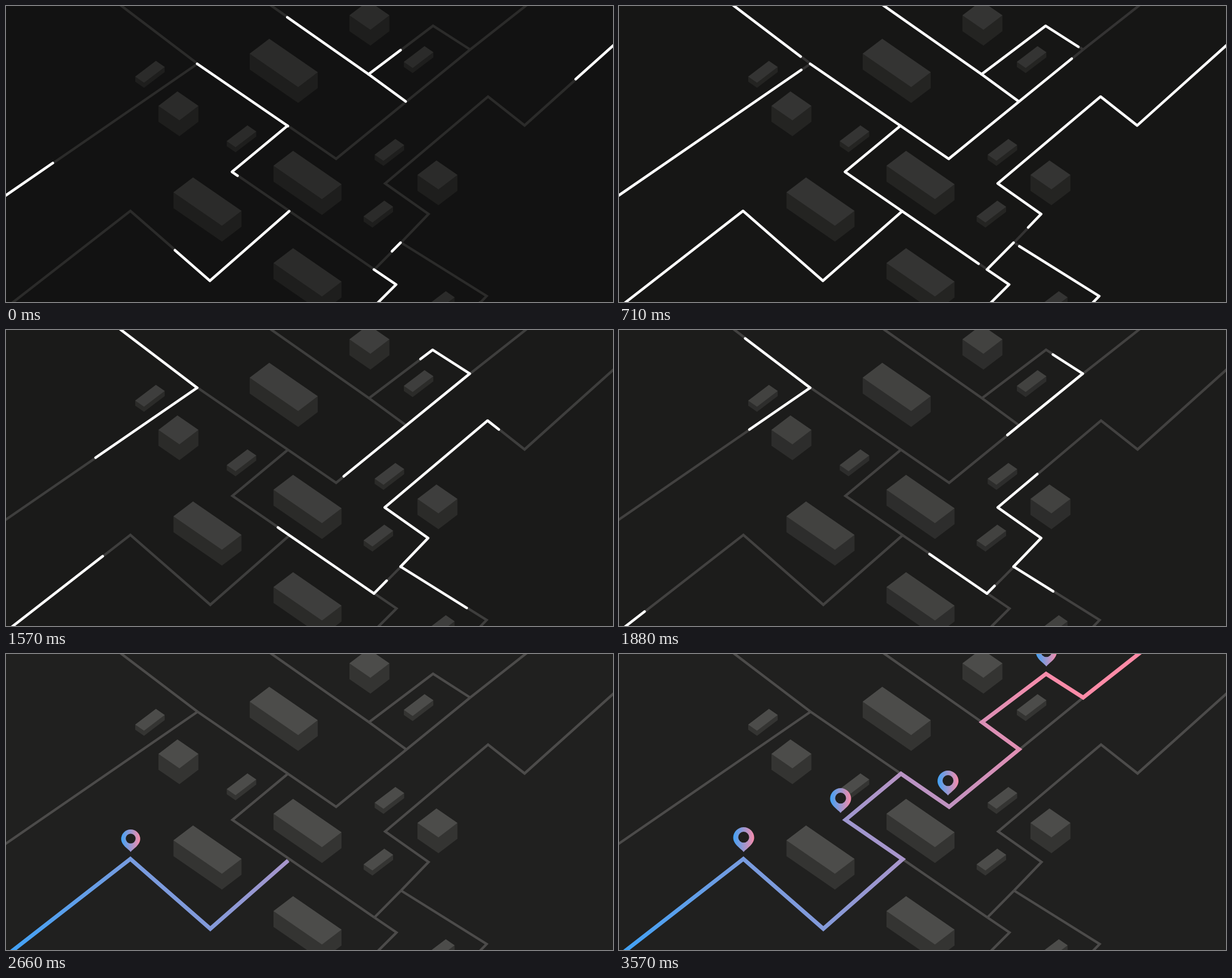
An HTML page with a canvas for the animation above (4.34 s loop, 1071 by 523 pixels).

```html
<!DOCTYPE html>
<html lang="en">
<head>
<meta charset="utf-8">
<title>City routes</title>
<style>
  html, body { margin: 0; width: 100%; height: 100%; overflow: hidden; background: #20201f; }
  canvas { display: block; }
</style>
</head>
<body>
<canvas id="stage" width="1071" height="523"></canvas>
<script>
const ctx = document.getElementById('stage').getContext('2d');
const WIDTH = 1071, HEIGHT = 523;
const LOOP = 4340, STEP = 77.6, LAST_STEP = 46;
const GROUND = '#20201f', BLUE = '#42a2f5', PINK = '#ff8ba7';

// Street corners, then the road ends outside the stage.
const nodes = {
  A: [338, 102], B: [497.5, 211.5], C: [582.5, 270], D: [706, 168.5], E: [640.5, 120.5],
  F: [753.5, 35], G: [819, 77], H: [399.5, 293], I: [500.5, 362.5], J: [360.5, 485.5],
  K: [219.5, 362], L: [650, 465.5], M: [689, 492], N: [915, 211], O: [850.5, 160],
  P: [669, 313.5], Q: [745.5, 367.5], R: [697, 418], S: [848, 512.5],
  west: [-38, 361], north: [-64, -204], top: [57, -289], southwest: [-141, 643],
  east: [1221, -64], south: [355, 826], southeast: [771, 592], northeast: [942, -20],
};

// Joins named nodes; reach[name] is the distance along the line to that node.
function polyline(names) {
  const shape = new Path2D(), reach = {};
  let length = 0, last;
  for (const name of names.split(' ')) {
    const [x, y] = nodes[name];
    if (last) length += Math.hypot(x - last[0], y - last[1]);
    reach[name] = length;
    shape.lineTo(x, y);
    last = [x, y];
  }
  return { shape, length, reach };
}

// Every road carries one white trail from its first node to its last.
const roads = ['west A', 'north A', 'A C G', 'D E top', 'E F G', 'B H L', 'I J K southwest',
  'east N O P Q R', 'R L', 'L M south', 'southeast S R'].map(polyline);
const exitRoad = polyline('G northeast');
const route = polyline('southwest K J I H B C D E F G northeast');

// Pins stand near these corners; the offset leads to the tip.
const pins = { K: [0.5, -12], H: [-8.5, -12], C: [-2, -20], F: [0.5, -13] };
const pinShape = new Path2D(
  'M0 0C-3 -5 -18.5 -13 -18.5 -25.5A18.5 18.5 0 1 1 18.5 -25.5C18.5 -13 3 -5 0 0Z');

// Isometric boxes: extent to the right and left, height, places of the back corner.
const RIGHT_SLOPE = 0.69, LEFT_SLOPE = 0.76;
const blocks = [
  { right: 85.5, left: 34.5, height: 28, at: [[464.5, 58], [506.5, 256], [330, 303], [506.5, 428]] },
  { right: 37, left: 33.5, height: 28, at: [[302.5, 151], [759.5, 273], [639.5, -9]] },
  { right: 15.5, left: 36.5, height: 9,
    at: [[264.5, 97], [426, 211], [687, 235], [667.5, 344], [738.5, 71], [776, 504]] },
];

const gradient = (...line) => {
  const g = ctx.createLinearGradient(...line);
  g.addColorStop(0, BLUE);
  g.addColorStop(1, PINK);
  return g;
};
const routeColor = gradient(10, 523, 800, 40);
const pinColor = gradient(-18, 0, 20, 0);

const clamp = v => Math.min(1, Math.max(0, v));
const smooth = v => v * v * (3 - 2 * v);

function strokeStyle(color, width, ends) {
  ctx.strokeStyle = color;
  ctx.lineWidth = width;
  ctx.lineCap = ends === 'round' ? 'round' : 'butt';
  ctx.lineJoin = ends;
}

function strokePart({ shape }, from, to) {
  if (to <= from) return;
  ctx.setLineDash([to - from, 9999]);
  ctx.lineDashOffset = -from;
  ctx.stroke(shape);
  ctx.setLineDash([]);
}

function fillPolygon(color, corners) {
  ctx.fillStyle = color;
  ctx.beginPath();
  for (const corner of corners) ctx.lineTo(...corner);
  ctx.fill();
}

function drawBlock(x, y, { right, left, height }) {
  const corner = (r, l, drop = 0) =>
    [x + r - l, y + r * RIGHT_SLOPE + l * LEFT_SLOPE + drop];
  fillPolygon('#343432', [corner(0, 0), corner(right, 0), corner(right, 0, height),
    corner(right, left, height), corner(0, left, height), corner(0, left)]);
  fillPolygon('#4c4c4a', [corner(0, 0), corner(right, 0), corner(right, left), corner(0, left)]);
}

function drawCity(brightness) {
  ctx.fillStyle = GROUND;
  ctx.fillRect(0, 0, WIDTH, HEIGHT);
  strokeStyle('#4c4b4a', 4.4, 'miter');
  for (const road of [...roads, exitRoad]) ctx.stroke(road.shape);
  for (const block of blocks) {
    for (const [x, y] of block.at) drawBlock(x, y, block);
  }
  ctx.fillStyle = `rgba(0,0,0,${1 - brightness})`;
  ctx.fillRect(0, 0, WIDTH, HEIGHT);
}

function drawTrails(n) {
  const head = clamp(0.323 + 0.0706 * n);
  const tail = clamp(0.188 + 0.0479 * (n - 13));
  strokeStyle('#fff', 4.6, 'round');
  ctx.save();
  ctx.translate(-0.8, 0.1);
  for (const road of roads) strokePart(road, tail * road.length, head * road.length);
  ctx.restore();
}

function drawPin(x, y, scale) {
  if (!scale) return;
  ctx.save();
  ctx.translate(x, y);
  ctx.scale(scale, scale);
  ctx.fillStyle = pinColor;
  ctx.fill(pinShape);
  ctx.fillStyle = GROUND;
  ctx.beginPath();
  ctx.arc(0, -26.3, 9.6, 0, 2 * Math.PI);
  ctx.fill();
  ctx.restore();
}

// The route slows down slightly; each pin grows once the route has passed it.
function drawRoute(n) {
  const s = n - 29;
  const head = 206.5 + 129.7 * s - 1.11 * s * s;
  strokeStyle(routeColor, 7, 'miter');
  strokePart(route, 0, Math.min(route.length, head));
  for (const [name, [dx, dy]] of Object.entries(pins)) {
    const [x, y] = nodes[name];
    drawPin(x + dx, y + dy, smooth(clamp((head - route.reach[name] - 45) / 400)));
  }
}

function draw(time) {
  // Motion advances in even steps, then rests on the finished route.
  const n = Math.min(LAST_STEP, Math.floor(time % LOOP / STEP));
  drawCity(clamp(0.57 + 0.0125 * n));
  drawTrails(n);
  drawRoute(n);
}

const begin = performance.now();
function tick() {
  draw(performance.now() - begin);
  requestAnimationFrame(tick);
}
tick();
</script>
</body>
</html>
```
